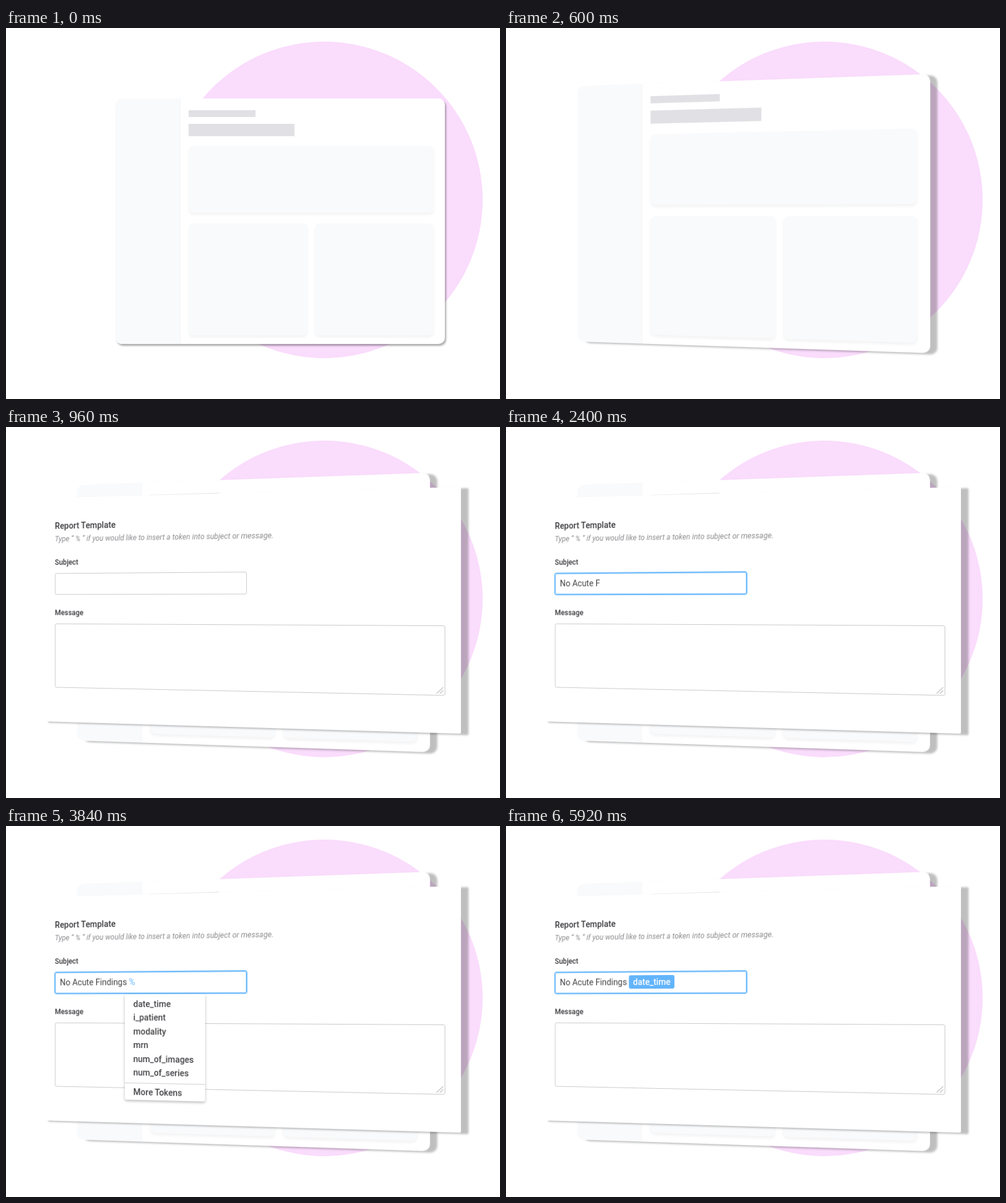
Animation of 798x600 px, one loop 6.32 s. Source, as an HTML page:

```html
<!DOCTYPE html>
<html lang="en">
<head>
<meta charset="utf-8">
<title>Report template</title>
<style>
  html, body { margin: 0; width: 100%; height: 100%; overflow: hidden; background: #fff; }
  body { position: relative; font: 14.3px/20px Roboto, sans-serif; color: #424246; }
  div { position: absolute; box-sizing: border-box; white-space: pre; }
  #circle { left: 257.5px; top: 21.5px; width: 512px; height: 512px; border-radius: 50%; background: #fadcfc; }
  #board, #form { left: 0; top: 0; background: #fff; transform-origin: 0 0; }
  #board { width: 532px; height: 397px; border-radius: 10px; }
  #form { width: 677px; height: 374px; border-radius: 2px; }
  .side { left: 0; top: 0; width: 105px; height: 397px; background: #f9fafc; border-right: 1px solid #f4f5f7; border-radius: 10px 0 0 10px; }
  .bar { left: 118px; background: #e1e1e5; }
  .card { background: #f9fafc; border-radius: 8px; box-shadow: 0 3px 4px rgba(0, 0, 0, .05); }
  .label { left: 23px; font-weight: 500; font-size: 12.3px; color: #38383c; }
  .field { left: 23px; border: 1px solid #cbcbcf; border-radius: 3px; }
  #subject { top: 126px; width: 324.5px; height: 35.5px; padding-left: 8px; line-height: 33px; }
  #token { color: #60b4fb; }
  #token.pill { display: inline-block; padding: 0 7px; line-height: 22px; border-radius: 3px; background: #62b4fb; color: #fff; font-weight: 500; }
  .menu { left: 144.6px; top: 163px; width: 135.7px; padding: 5px 0 0 15px; background: #fff; border-radius: 0 0 3px 3px;
    box-shadow: 0 2px 4px rgba(0, 0, 0, .28); font-weight: 500; line-height: 22.4px; }
  #all { height: 173px; }
  #match { height: 36px; }
  .more { left: 0; top: 144.5px; width: 100%; padding: 3px 0 0 15px; border-top: 1px solid #cfcfd3; }
  svg { position: absolute; right: 1px; bottom: 1px; }
</style>
</head>
<body>
<div id="circle"></div>

<div id="board">
  <div class="side"></div>
  <div class="bar" style="top:19px;width:108px;height:11px"></div>
  <div class="bar" style="top:41px;width:171px;height:19.5px"></div>
  <div class="card" style="left:118px;top:77px;width:396px;height:108px"></div>
  <div class="card" style="left:118px;top:202px;width:192px;height:181px"></div>
  <div class="card" style="left:322px;top:202px;width:192px;height:181px"></div>
</div>

<div id="form">
  <div class="label" style="top:37px;font-size:14.3px">Report Template</div>
  <div class="label" style="top:58.5px;font:italic 12.5px/20px Roboto,sans-serif;color:#8c8c90">Type “ % ” if you would like to insert a token into subject or message.</div>
  <div class="label" style="top:97.5px">Subject</div>
  <div class="field" id="subject"><span id="typed"></span><span id="token"></span></div>
  <div class="label" style="top:182px">Message</div>
  <div class="field" style="top:210px;width:630.5px;height:107.3px">
    <svg width="12" height="12" stroke="#a0a0a4"><path d="M1 11 11 1M6 11 11 6"/></svg>
  </div>
  <div class="menu" id="match">date_time</div>
  <div class="menu" id="all">date_time
i_patient
modality
mrn
num_of_images
num_of_series<div class="more">More Tokens</div></div>
</div>

<script>
const LOOP = 6320;
const $ = id => document.getElementById(id);
const [board, form, subject, typed, token, all, match] =
  ['board', 'form', 'subject', 'typed', 'token', 'all', 'match'].map($);

// Upright trapezoids: left x, top, height, then right x, top, height
const boardFrom = [177, 114, 397, 709, 114, 397], boardTo = [115, 94, 413, 685, 74, 452];
const formFrom = [196, 199, 245, 659, 189, 261], formTo = [58, 115, 361, 735, 97, 399];

// Typing runs: text, time of the first character, interval
const subjectRuns = [['No', 1640, 110], [' Acute ', 1860, 56], ['Findings', 2395, 35], [' ', 2840, 1]];
const tokenRuns = [['%', 2880, 1], ['d', 3880, 1], ['ate_time', 4320, 80]];

const clamp = v => Math.min(1, Math.max(0, v));
const progress = (t, start, length) => clamp((t - start) / length);
const mix = (a, b, p) => a + (b - a) * p;

// CSS "ease": cubic-bezier(.25, .1, .25, 1)
function ease(x) {
  let lo = 0, hi = 1;
  const bezier = (s, a, b) => 3 * (1 - s) ** 2 * s * a + 3 * (1 - s) * s * s * b + s ** 3;
  for (let i = 0; i < 22; i++) {
    const mid = (lo + hi) / 2;
    if (bezier(mid, .25, .25) < x) lo = mid; else hi = mid;
  }
  return bezier(hi, .1, 1);
}

function project(el, w, h, from, to, p) {
  const [x0, y0, h0, x1, y1, h1] = from.map((v, i) => mix(v, to[i], p));
  const r = h0 / h1;
  el.style.transform = `matrix3d(${[
    (x1 * r - x0) / w, (y1 * r - y0) / w, 0, (r - 1) / w,
    0, h0 / h, 0, 0,
    0, 0, 1, 0,
    x0, y0, 0, 1].map(v => v.toFixed(9))})`;
}

const type = (runs, t) => runs.map(([text, start, step]) =>
  t < start ? '' : text.slice(0, Math.floor((t - start) / step) + 1)).join('');

function draw(t) {
  const tilt = ease(progress(t, 0, 700));
  project(board, 532, 397, boardFrom, boardTo, tilt);
  board.style.boxShadow = `${mix(2, 10, tilt)}px ${mix(3, 2, tilt)}px 3px rgba(0,0,0,${mix(.32, .25, tilt)})`;

  const rise = ease(progress(t, 640, 320));
  project(form, 677, 374, formFrom, formTo, rise);
  form.style.opacity = rise;
  form.style.boxShadow = '11px 2px 3px rgba(0,0,0,.25)';

  const focus = progress(t, 1240, 200);
  const blue = `rgba(96,180,251,${focus})`;
  subject.style.boxShadow = `0 0 0 .8px ${blue}, inset 0 0 0 .4px ${blue}`;
  subject.style.borderColor = `rgb(${mix(203, 96, focus)},${mix(203, 180, focus)},${mix(207, 251, focus)})`;

  const picked = t >= 5400;
  typed.textContent = type(subjectRuns, t);
  token.textContent = picked ? 'date_time' : type(tokenRuns, t);
  token.className = picked ? 'pill' : '';

  const filter = progress(t, 3840, 200);
  all.style.opacity = progress(t, 2840, 160) * (1 - filter);
  match.style.opacity = picked ? 0 : filter;
}

function tick() {
  draw(performance.now() % LOOP);
  requestAnimationFrame(tick);
}
tick();
</script>
</body>
</html>
```
